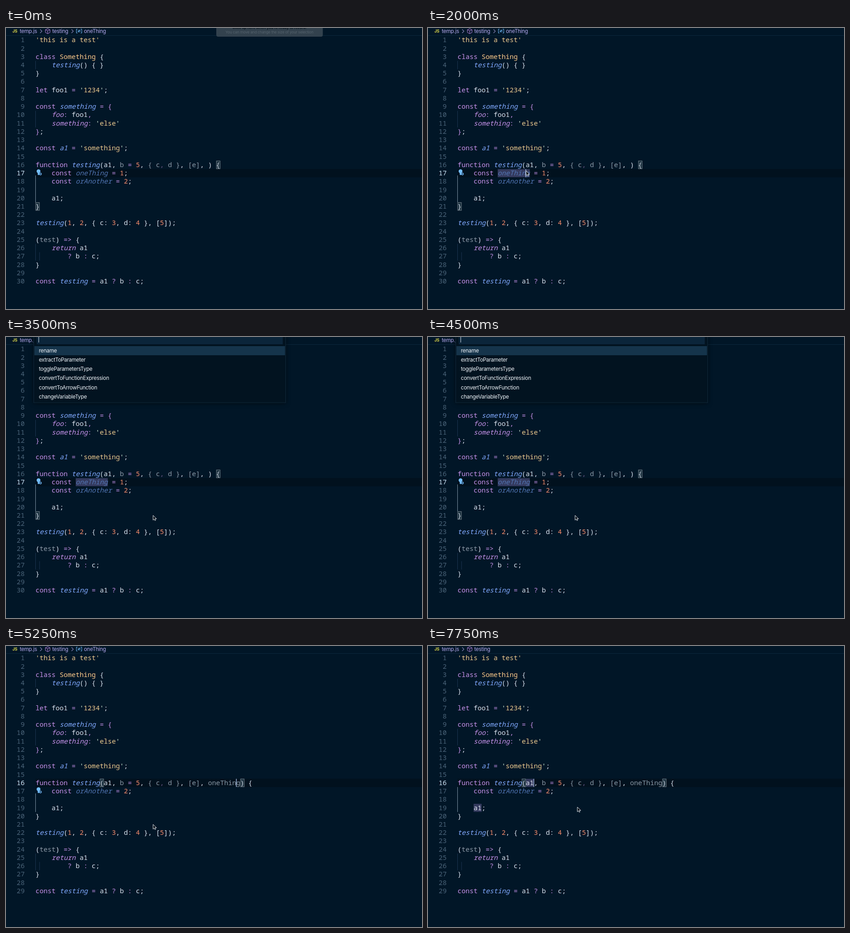
Recreate the animation shown at these times as an HTML page. Size 908 by 616 pixels, loop 8000 ms.

```html
<!DOCTYPE html>
<html lang="en">
<head>
<meta charset="utf-8">
<title>Editor refactoring</title>
<style>
  html, body { margin: 0; width: 100%; height: 100%; overflow: hidden; background: #011627; }
  svg { display: block; width: 908px; height: 616px; }
  text { white-space: pre; }
  .code text { font-family: "Noto Sans Mono", "DejaVu Sans Mono", monospace; font-kerning: none; font-variant-ligatures: none; }
  .ui { font: 11.5px Inter, "Open Sans", sans-serif; letter-spacing: -.28px; }
  .num { fill: #4b6479; text-anchor: end; }
  .num.on { fill: #d2e6f8; }
  .p { fill: #c792ea; } .P { fill: #c792ea; font-style: italic; }
  .w { fill: #dce3ef; } .s { fill: #f0cb90; } .q { fill: #d9f5dd; }
  .n { fill: #ffcb8b; } .o { fill: #f78c6c; }
  .f { fill: #82aaff; font-style: italic; } .d { fill: #5275b3; font-style: italic; }
  .g { fill: #8c98a6; } .h { fill: #6a5887; }
</style>
</head>
<body>
<svg id="stage" viewBox="0 0 908 616" xmlns="http://www.w3.org/2000/svg"></svg>
<script>
const LOOP = 8000, STEP = 250;
const LEFT = 64.5, PITCH = 8.765, TOP = 17.4, ROW = 18.235;
const FONT_SIZE = PITCH / .6;

// "~x" switches to the token style x
const before = [
  "~s'this is a test'", '',
  '~pclass ~nSomething ~w{', '    ~ftesting~w() { }', '~w}', '',
  "~plet ~wfoo1 ~p= ~q'~s1234~q'~w;", '',
  '~pconst ~fsomething ~p= {', '    ~Pfoo~p: ~wfoo1~p,', "    ~Psomething~p: ~q'~selse~q'", '~p}~w;', '',
  "~pconst ~fa1 ~p= ~q'~ssomething~q'~w;", '',
  '~pfunction ~ftesting~w(a1, ~gb ~p= ~o5~w, ~g{ c~h, ~gd }~w, ~g[e]~w, ) {',
  '    ~pconst ~doneThing ~p= ~o1~w;', '    ~pconst ~dorAnother ~p= ~o2~w;', '', '    ~wa1;', '~w}', '',
  '~ftesting~w(~o1~w, ~o2~w, { c: ~o3~w, d: ~o4 ~w}, [~o5~w]);', '',
  '~w(~gtest~w) ~p=> ~w{', '    ~Preturn ~wa1', '        ~p? ~wb ~p: ~wc;', '~w}', '',
  '~pconst ~ftesting ~p= ~wa1 ~p? ~wb ~p: ~wc;'
];
const after = before.filter((_, i) => i !== 16);
after[15] = before[15].replace(', ) {', ', ~goneThing~w) {');

const menuItems = ['rename', 'extractToParameter', 'toggleParametersType',
  'convertToFunctionExpression', 'convertToArrowFunction', 'changeVariableType'];

const colX = c => LEFT + c * PITCH;
const rowY = n => TOP + (n - 1) * ROW;
const rect = (x, y, w, h, fill, extra = '') =>
  `<rect x="${x}" y="${y}" width="${w}" height="${h}" fill="${fill}" ${extra}/>`;
const label = (x, y, s, fill, extra = '') =>
  `<text class="ui" x="${x}" y="${y}" fill="${fill}" ${extra}>${s}</text>`;
const escapeText = s => s.replace(/&/g, '&amp;').replace(/</g, '&lt;').replace(/>/g, '&gt;');

function tokens(line) {
  return line.split('~').map((part, i) => i
    ? `<tspan class="${part[0]}">${escapeText(part.slice(1))}</tspan>` : part).join('');
}

function codeLines(lines, active) {
  return lines.map((line, i) => {
    const y = rowY(i + 1) + 13.9;
    return `<text class="num${i + 1 === active ? ' on' : ''}" x="40.7" y="${y}">${i + 1}</text>` +
      `<text xml:space="preserve" x="${LEFT}" y="${y}">${tokens(line)}</text>`;
  }).join('');
}

const guide = (col, from, to) =>
  rect(colX(col) - .5, rowY(from), 1, (to - from + 1) * ROW, '#1c3550');
const bracket = (col, row) =>
  rect(colX(col) + .4, rowY(row) + .5, PITCH - .8, ROW - 1, '#1a303e', 'stroke="#75818a" stroke-width="1"');
const word = (col, row, len) =>
  rect(colX(col), rowY(row) + .3, len * PITCH, ROW - .6, '#343a5e');

function editor(id, lines, active, blockEnd, brackets, words) {
  const shift = lines.length - 30;
  return `<g id="${id}">` +
    rect(LEFT, rowY(active), 908 - LEFT, ROW, '#01111e') +
    guide(0, 4, 4) + guide(0, 10, 11) + guide(0, 26 + shift, 27 + shift) + guide(1, 27 + shift, 27 + shift) +
    rect(LEFT - .5, rowY(17) + 14, 1, (blockEnd - 16) * ROW - 14, '#7d92a3') +
    `<g id="${id}Words">${words}</g>` + brackets +
    `<g class="code" font-size="${FONT_SIZE}">${codeLines(lines, active)}</g></g>`;
}

const chevron = x =>
  `<path d="M${x} 3l4 4-4 4" fill="none" stroke="#8a86b8" stroke-width="1.1"/>`;

const header =
  rect(0, 16, 908, 1, '#0d283c') +
  label(14, 10, 'JS', '#d6d04a', 'style="font-size:9px;font-weight:700"') +
  label(30, 10.8, 'temp.js', '#b5a9ee') + chevron(74.5) +
  '<path d="M91 1.5l5 2.3v6l-5 2.7-5-2.7v-6zM86 3.8l5 2.5 5-2.5M91 6.3v6" fill="none" stroke="#b180d7"/>' +
  label(101, 10.8, 'testing', '#b5a9ee') +
  `<g id="crumb">${chevron(143)}` +
  '<path d="M156 2.5h-2.3v8.5h2.3M163 2.5h2.3v8.5h-2.3M157 9l5-5" fill="none" stroke="#75beff"/>' +
  '<ellipse cx="159.5" cy="6.7" rx="2.5" ry="2" fill="none" stroke="#75beff"/>' +
  label(170, 10.8, 'oneThing', '#b5a9ee') + '</g>';

const bulb = '<g id="bulb"><circle cx="71" cy="314" r="4.2" fill="#75beff"/>' +
  rect(69.3, 317, 3.4, 5.2, '#75beff', 'rx="1"') +
  '<circle cx="75.2" cy="320" r="2" fill="#01111e" stroke="#75beff" stroke-width="1.4"/></g>';

const menu = '<g id="menu">' +
  rect(60.5, -6, 550, 150, '#021320', 'stroke="#10283a" style="filter:drop-shadow(0 1px 5px #0008)"') +
  rect(67, -4, 537, 20, '#0b253a') +
  rect(71, 0, 1, 12, '#d6deeb', 'id="inputCaret"') +
  rect(62, 20, 547, 20, '#15344b', 'id="choice"') +
  menuItems.map((s, i) => label(71.7, 34.2 + i * 20.08, s, '#f1f5fa')).join('') + '</g>';

const notice = '<g id="notice">' +
  rect(459, -8, 232.5, 27, '#33424e', 'rx="4"') +
  label(575, 2, "Click up here when you're ready to record.", '#07121b',
    'text-anchor="middle" style="font-size:8.3px;font-weight:600;letter-spacing:-.2px"') +
  label(575, 12.2, 'You can move and change the size of your selection', '#55636e',
    'text-anchor="middle" style="font-size:8.2px;letter-spacing:-.2px"') + '</g>';

const stage = document.getElementById('stage');
stage.innerHTML = rect(0, 0, 908, 616, '#011627') + header +
  editor('old', before, 17, 20, bracket(45, 16) + bracket(0, 21), word(10, 17, 8)) +
  editor('new', after, 16, 19, bracket(16, 16) + bracket(51, 16), word(17, 16, 2) + word(4, 19, 2)) +
  rect(LEFT - .5, rowY(17), 1, 14.5, '#7d92a3', 'id="guideTop"') +
  bulb + rect(0, 0, 1.5, ROW - .4, '#9fb4d8', 'id="caret"') + menu + notice +
  '<path id="mouse" d="M0 0v10.4l2.5-2.2 1.6 3.3 1.7-.8-1.6-3.2h3.3z" fill="#06101a" stroke="#e4e8ec" stroke-width="1" stroke-linejoin="round"/>';

const $ = id => document.getElementById(id);
const show = (id, on) => $(id).setAttribute('visibility', on ? 'inherit' : 'hidden');

// time, x, y of the pointer tip
const path = [
  [500, 500, 50], [750, 395, 190], [1000, 290, 288], [1250, 255, 314],
  [1500, 231, 314], [1750, 214, 313], [2000, 214, 313], [2250, 282, 362], [2500, 321, 391],
  [6250, 321, 391], [6500, 300, 362], [6750, 254, 318], [7000, 229, 300], [7250, 226, 298],
  [7500, 274, 325], [7750, 326, 353]
];

function pointer(t) {
  const i = path.findIndex(k => k[0] > t);
  if (i < 0) return path[path.length - 1].slice(1);
  const [a, b] = [path[Math.max(i - 1, 0)], path[i]];
  const k = i ? (t - a[0]) / (b[0] - a[0]) : 0;
  return [a[1] + (b[1] - a[1]) * k, a[2] + (b[2] - a[2]) * k];
}

const within = (t, a, b) => t >= a && t < b;
const blink = (t, start) => Math.floor((t - start) / 500) % 2 === 0;

function draw(time) {
  const t = Math.floor((time % LOOP) / STEP) * STEP;
  const edited = t >= 5250, menuOpen = within(t, 3500, 5250);

  show('notice', t < 250);
  show('old', !edited);
  show('new', edited);
  show('oldWords', !edited && t >= 2000);
  show('newWords', t >= 7500);
  show('crumb', t < 5750);
  show('bulb', t < 5500);
  show('guideTop', t >= 5500);

  show('menu', menuOpen);
  show('inputCaret', menuOpen && blink(t, 3500));
  $('choice').setAttribute('y', t < 4750 ? 20 : 40);

  const clicked = t >= 7250;
  const caretOn = within(t, 2000, 3500) ? blink(t, 2000)
    : edited && (clicked || blink(t, 5250));
  show('caret', caretOn);
  $('caret').setAttribute('x', colX(clicked ? 19 : edited ? 50 : 17) - .8);
  $('caret').setAttribute('y', rowY(edited ? 16 : 17) + .2);

  const [x, y] = pointer(t);
  show('mouse', t >= 500);
  $('mouse').setAttribute('transform', `translate(${x} ${y})`);
}

const start = performance.now();
function tick() {
  draw(performance.now() - start);
  requestAnimationFrame(tick);
}
draw(0);
requestAnimationFrame(tick);
</script>
</body>
</html>
```
